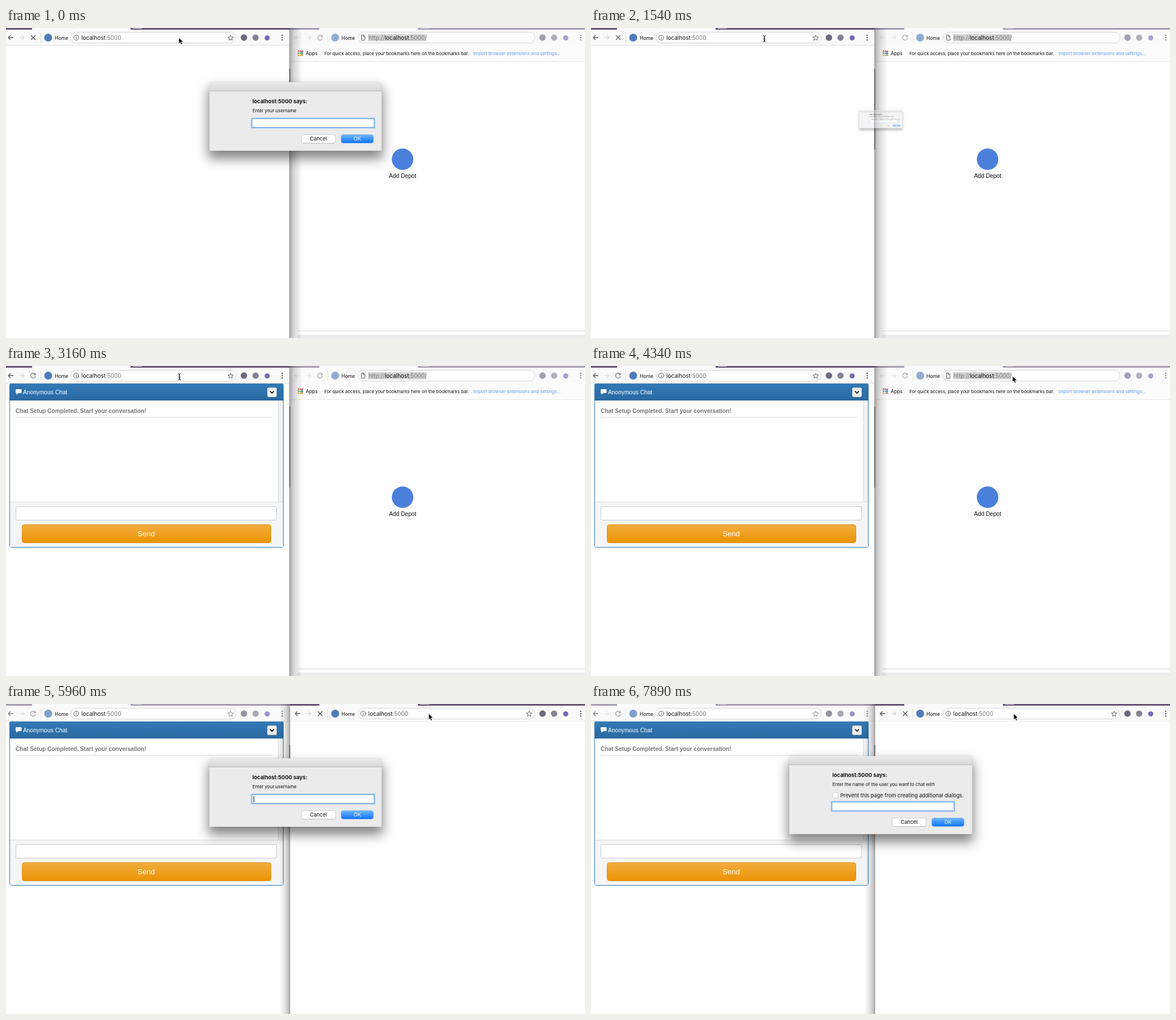
Write an HTML page that moves like this. It is 1022 px wide and 548 px high and loops after 8 s.

```html
<!DOCTYPE html>
<html lang="en">
<head>
<meta charset="utf-8">
<title>Anonymous Chat</title>
<style>
html, body { margin: 0; width: 100%; height: 100%; overflow: hidden; background: #fff; }
#stage { position: relative; width: 1022px; height: 548px; overflow: hidden; font-family: Inter, sans-serif; }
svg { position: absolute; left: 0; top: 0; display: block; }
text { white-space: pre; }
.line { fill: none; stroke: #5a5a5a; stroke-width: 1.35; }
.url { font-size: 10px; fill: #777; }
.url tspan { fill: #111; }
.small { font-size: 7.9px; }
.label { font-size: 8.6px; fill: #111; }
.sans { font-family: "Liberation Sans", Arial, sans-serif; }

/* every change is a hard one on an 8 s loop */
.a { animation: 8s step-end infinite; }

/* window focus */
.focusL { animation-name: focusL; }
.focusR { opacity: 0; animation-name: focusR; }
.iconsL { animation-name: iconsL; }
.iconsR { opacity: .62; animation-name: iconsR; }
.mark { fill: #d2d2d2; animation-name: mark; }
@keyframes focusL { 56.125% { opacity: 0 } }
@keyframes focusR { 0% { opacity: 0 } 56.125%, 100% { opacity: 1 } }
@keyframes iconsL { 56.125% { opacity: .72 } 100% { opacity: .72 } }
@keyframes iconsR { 56.125%, 100% { opacity: 1 } }
@keyframes mark { 56.125%, 100% { fill: #b4d5fe } }

/* page states */
.waitL { animation-name: waitL; }
.chat { opacity: 0; animation-name: chat; }
.newTab { animation-name: newTab; }
.loadR { opacity: 0; animation-name: loadR; }
@keyframes waitL { 39.5%, 100% { opacity: 0 } }
@keyframes chat { 39.5%, 100% { opacity: 1 } }
@keyframes newTab { 67.25%, 100% { opacity: 0 } }
@keyframes loadR { 67.25%, 100% { opacity: 1 } }

/* pointer */
.arrow { transform: translate(305px, 17px); animation-name: arrow; }
.beam { opacity: 0; animation-name: beam; }
@keyframes arrow {
  0% { transform: translate(305px, 17px); opacity: 1 }
  19.25% { transform: translate(305px, 17px); opacity: 0 }
  46.875% { transform: translate(637px, 43px); opacity: 1 }
  50.625% { transform: translate(692px, 30px) }
  52.375% { transform: translate(729px, 21px) }
  54.25% { transform: translate(744px, 18px) }
  57.875%, 100% { transform: translate(746px, 17px); opacity: 1 }
}
@keyframes beam { 19.25% { opacity: 1 } 43.25% { opacity: 0 } }

/* dialogs */
.dlg {
  position: absolute; box-sizing: border-box; white-space: nowrap; color: #111;
  border-radius: 4px 4px 2px 2px; font-size: 9.2px; line-height: 12px;
  background: linear-gradient(#ebebeb, #d6d6d6 15px, #bebebe 15px, #bebebe 16px, #ebebeb 16px);
  box-shadow: 0 0 1px rgba(0,0,0,.5), 0 12px 20px 2px rgba(0,0,0,.48);
}
.dlg > * { position: absolute; margin: 0; }
.dlg b { left: 76px; top: 28px; font-size: 9.4px; }
.dlg p { left: 76px; top: 44px; font-size: 7.9px; }
.field {
  left: 76px; width: 212px; height: 14px; padding-left: 2px; line-height: 14px;
  background: #fff; box-shadow: 0 0 0 1px #7aabea, 0 0 0 2.5px #90c0f8;
}
.field span { font-size: 0; }
.field i { display: inline-block; width: 1px; height: 11px; background: #111; vertical-align: middle; opacity: 0; }
.btn {
  right: 82px; bottom: 14px; width: 59px; height: 14px; line-height: 14px; text-align: center;
  border-radius: 3px; background: #fff; box-shadow: 0 0 0 .5px #b8b8b8, 0 .5px 1px rgba(0,0,0,.3);
}
.ok { right: 15px; width: 56px; color: #fff; background: linear-gradient(#6db5fb, #0c74fd); box-shadow: 0 0 0 .5px #2a80e8; }
.box { left: 77px; top: 65px; width: 9px; height: 9px; border-radius: 2px; background: #fafafa; box-shadow: 0 0 0 .5px #bbb; }
.more { left: 90px; top: 64px; }

.d1 { left: 359px; top: 96px; width: 304px; height: 121px; animation-name: d1; }
.d2 { left: 350px; top: 92px; width: 323px; height: 138px; opacity: 0; animation-name: d2; }
.d1 .field { top: 65px; }
.d2 .field { top: 82px; }
@keyframes d1 {
  0% { opacity: 1; transform: none }
  13.75% { opacity: .4 }
  15.5% { opacity: 0; transform: none }
  70.875% { opacity: .55; transform: scale(.235) }
  72.625% { opacity: 1; transform: scale(1.04) }
  74.5% { opacity: 1; transform: none }
  87.5% { opacity: .4 }
  89.375%, 100% { opacity: 0; transform: none }
}
@keyframes d2 {
  0% { opacity: 0; transform: none }
  19.25% { opacity: .55; transform: scale(.235) }
  21.125% { opacity: 1; transform: scale(1.04) }
  22.875% { opacity: 1; transform: none }
  37.625% { opacity: .4 }
  39.5% { opacity: 0; transform: none }
  91.25% { opacity: .55; transform: scale(.235) }
  93.125% { opacity: 1; transform: scale(1.04) }
  95%, 100% { opacity: 1; transform: none }
}

/* typing: letters grow from nothing, the caret follows them */
.k1 { animation-name: k1; } .k2 { animation-name: k2; } .k3 { animation-name: k3; }
.m1 { animation-name: m1; } .m2 { animation-name: m2; }
.n1 { animation-name: n1; } .n2 { animation-name: n2; } .n3 { animation-name: n3; }
.c1 { animation-name: c1; } .c2 { animation-name: c2; }
@keyframes k1 { 5.625% { font-size: 8.6px } 15.5% { font-size: 0 } }
@keyframes k2 { 7.75% { font-size: 8.6px } 15.5% { font-size: 0 } }
@keyframes k3 { 10% { font-size: 8.6px } 15.5% { font-size: 0 } }
@keyframes m1 { 83.75%, 100% { font-size: 8.6px } }
@keyframes m2 { 85.625%, 100% { font-size: 8.6px } }
@keyframes n1 { 28.5% { font-size: 8.6px } 39.5% { font-size: 0 } }
@keyframes n2 { 30.375% { font-size: 8.6px } 39.5% { font-size: 0 } }
@keyframes n3 { 32.125% { font-size: 8.6px } 39.5% { font-size: 0 } }
@keyframes c1 { 5.625% { opacity: 1 } 78.25% { opacity: 0 } 83.75%, 100% { opacity: 1 } }
@keyframes c2 { 28.5% { opacity: 1 } 39.5% { opacity: 0 } 96.875% { opacity: 1 } 98.625%, 100% { opacity: 0 } }
</style>
</head>
<body>
<div id="stage">
<svg width="1022" height="548" viewBox="0 0 1022 548">
  <defs>
    <linearGradient id="blue" x2="0" y2="1"><stop stop-color="#337ab7"/><stop offset="1" stop-color="#2a69a2"/></linearGradient>
    <linearGradient id="orange" x2="0" y2="1"><stop stop-color="#f2ad3f"/><stop offset="1" stop-color="#ec9304"/></linearGradient>
    <linearGradient id="shade"><stop stop-opacity=".3"/><stop offset=".4" stop-opacity=".13"/><stop offset="1" stop-opacity="0"/></linearGradient>
    <path id="back" class="line" d="M13 17H4M8 13l-4 4 4 4"/>
    <path id="next" class="line" d="M23 17h9M28 13l4 4-4 4" style="stroke:#dadada"/>
    <path id="stop" class="line" d="M44 13l8 8M52 13l-8 8"/>
    <g id="reload">
      <path class="line" d="M51 14A4.4 4.4 0 1 0 52.2 18" style="stroke:#858585"/>
      <path d="M52.6 11.8v4.4h-4.4z" fill="#858585"/>
    </g>
    <g id="home">
      <path d="M61.5 8v18" stroke="#d6d6d6"/>
      <circle cx="74.500" cy="17" r="7" fill="#4f7dbb"/>
    </g>
    <g id="site">
      <circle class="line" cx="124" cy="17" r="4.400" style="stroke-width:1"/>
      <path class="line" d="M124 16.400v3.200M124 14.200v1.200" style="stroke-width:1.1"/>
      <text class="url" x="133" y="20.800"><tspan>localhost</tspan>:5000</text>
    </g>
    <path id="star" class="line" style="stroke-width:1" d="M396.500 12.500l1.400 3.200 3.500.3-2.700 2.300.8 3.400-3-1.800-3 1.800.8-3.400-2.700-2.300 3.500-.3z"/>
    <g id="tools">
      <circle cx="420" cy="17" r="5.700" fill="#6d6880"/>
      <circle cx="440.500" cy="17" r="5.500" fill="#86838f"/>
      <circle cx="461" cy="17.500" r="4.500" fill="#7569b8"/>
      <g fill="#555"><circle cx="487.500" cy="13" r="1.200"/><circle cx="487.500" cy="17" r="1.200"/><circle cx="487.500" cy="21" r="1.200"/></g>
    </g>
  </defs>

  <!-- left window -->
  <rect width="500" height="548" fill="#fefefe"/>
  <rect width="500" height="30" fill="#fafafa"/>
  <path d="M0 30.500h500" stroke="#dedede"/>
  <path d="M0 1.500h46M220 1.500h281" stroke="#a59db2" stroke-width="3"/>
  <path class="a focusL" d="M0 1.500h46M220 1.500h281" stroke="#655879" stroke-width="3"/>
  <path d="M224 0h16" stroke="#d8d3df" stroke-width="2"/>
  <rect x="114.500" y="7.500" width="292" height="19" rx="9.500" fill="#fff" stroke="#d4d4d4"/>
  <g class="a iconsL">
    <use href="#back"/><use href="#next"/><use href="#home"/><use href="#star"/><use href="#tools"/>
    <use href="#stop" class="a waitL"/>
    <use href="#reload" class="a chat"/>
  </g>
  <text class="label" x="86" y="20.500">Home</text>
  <use href="#site"/>

  <g class="a chat sans">
    <rect x="6.500" y="31.500" width="483" height="289" rx="3" fill="#fff" stroke="#337ab7"/>
    <path d="M6 61V34a3 3 0 0 1 3-3h478a3 3 0 0 1 3 3v27z" fill="url(#blue)"/>
    <path d="M18 41h8.500a1 1 0 0 1 1 1v5a1 1 0 0 1-1 1h-5L18.500 51v-3H18a1 1 0 0 1-1-1v-5a1 1 0 0 1 1-1z" fill="#fff"/>
    <text x="30" y="49.500" font-size="10.200" fill="#fff">Anonymous Chat</text>
    <rect x="461.500" y="38.500" width="16" height="16" rx="2" fill="#f2f2f2" stroke="#ccc"/>
    <path d="M466 44.500l3.500 3.500 3.500-3.500" fill="none" stroke="#333" stroke-width="2"/>
    <text x="17" y="82.500" font-size="10.100" font-weight="700" fill="#777">Chat Setup Completed. Start your conversation!</text>
    <path d="M17 90.500h453" stroke="#d9d9d9"/>
    <rect x="481" y="61" width="8" height="179" fill="#f1f1f1"/>
    <path d="M480.500 61v179" stroke="#dcdcdc"/>
    <rect x="7" y="240" width="482" height="80" rx="2" fill="#f5f5f5"/>
    <path d="M7 240.500h482" stroke="#ddd"/>
    <rect x="17.500" y="248.500" width="460" height="24" rx="2.500" fill="#fff" stroke="#ccc"/>
    <rect x="28.500" y="280.500" width="439" height="32" rx="4" fill="url(#orange)" stroke="#e08e0b"/>
    <text x="247.500" y="301" font-size="13" text-anchor="middle" fill="#fff">Send</text>
  </g>

  <!-- right window -->
  <rect x="501" width="521" height="548" fill="#fefefe"/>
  <rect x="501" width="521" height="30" fill="#fafafa"/>
  <path d="M501 1.500h52M727 1.500h295" stroke="#a59db2" stroke-width="3"/>
  <path class="a focusR" d="M501 1.500h52M727 1.500h295" stroke="#655879" stroke-width="3"/>
  <path d="M731 0h16" stroke="#d8d3df" stroke-width="2"/>
  <rect x="621.500" y="7.500" width="312" height="19" rx="9.500" fill="#fff" stroke="#d4d4d4"/>
  <g class="a iconsR">
    <use href="#next" x="506.500"/><use href="#home" x="506.500"/><use href="#tools" x="527"/>
    <g class="a newTab">
      <use href="#back" x="506.500" opacity=".2"/>
      <use href="#reload" x="506.500"/>
    </g>
    <g class="a loadR">
      <use href="#back" x="506.500"/><use href="#stop" x="506.500"/><use href="#star" x="527"/>
    </g>
  </g>
  <text class="label" x="592" y="20.500">Home</text>
  <g class="a newTab">
    <path class="line" d="M627.500 12.500h3.500l2.500 2.500v6.500h-6zM631 12.500V15h2.500" style="stroke-width:1"/>
    <rect class="a mark" x="639" y="11" width="103" height="12.500"/>
    <text class="url" x="640" y="20.800">http://<tspan>localhost</tspan>:5000/</text>
    <rect x="501" y="30" width="521" height="29" fill="#fcfcfc"/>
    <path d="M501 59.500h521" stroke="#e6e6e6"/>
    <g fill="none" stroke-width="2.400" stroke-dasharray="2.400 1.200">
      <path d="M515 41h10" stroke="#e2574c"/>
      <path d="M515 44.600h10" stroke="#4a9a5c"/>
      <path d="M515 48.200h10" stroke="#e8b030"/>
      <path d="M522.200 41v8" stroke="#4a80d8"/>
    </g>
    <text class="label" x="529" y="48">Apps</text>
    <text class="small" x="562" y="48" fill="#111">For quick access, place your bookmarks here on the bookmarks bar.</text>
    <text class="small" x="825" y="48" fill="#5b9bf0">Import browser extensions and settings...</text>
    <circle cx="700" cy="232" r="19" fill="#4a80dc"/>
    <text class="sans" x="700" y="264.500" font-size="10.200" text-anchor="middle" fill="#111">Add Depot</text>
    <path d="M514 535.500h508" stroke="#d8d8d8"/>
    <rect x="514" y="542" width="508" height="6" fill="#ededed"/>
  </g>
  <g class="a loadR">
    <use href="#site" x="506.500"/>
    <path d="M502 30.500h520" stroke="#ececec"/>
  </g>

  <!-- seam and the shadow of the front window -->
  <rect class="a focusL" x="501" width="22" height="548" fill="url(#shade)"/>
  <rect class="a focusR" width="18" height="548" fill="url(#shade)" transform="translate(501) scale(-1 1)"/>
  <path d="M500.800 3v545" stroke="#8d8d8d" stroke-width="1.200"/>
  <path d="M500.800 72v143" stroke="#444" stroke-width="1.200"/>

  <path class="a arrow" d="M0 0v10.500l2.500-2.200 1.700 4 2-.9-1.700-3.800h3.400z" fill="#000" stroke="#fff" stroke-width=".7"/>
  <path class="a beam" d="M303.500 13.500q2.500 0 2.500 1.500v8q0 1.500-2.500 1.500M308.500 13.500q-2.500 0-2.500 1.500v8q0 1.500 2.500 1.500M304.500 20h3" fill="none" stroke="#111"/>
</svg>

<div class="dlg a d1">
  <b>localhost:5000 says:</b>
  <p>Enter your username</p>
  <div class="field"><span class="a k1">th</span><span class="a k2">e</span><span class="a k3">o</span><span class="a m1">te</span><span class="a m2">ss</span><i class="a c1"></i></div>
  <div class="btn">Cancel</div>
  <div class="btn ok">OK</div>
</div>

<div class="dlg a d2">
  <b>localhost:5000 says:</b>
  <p>Enter the name of the user you want to chat with</p>
  <div class="box"></div>
  <div class="more">Prevent this page from creating additional dialogs.</div>
  <div class="field"><span class="a n1">te</span><span class="a n2">s</span><span class="a n3">s</span><i class="a c2"></i></div>
  <div class="btn">Cancel</div>
  <div class="btn ok">OK</div>
</div>
</div>
</body>
</html>
```
